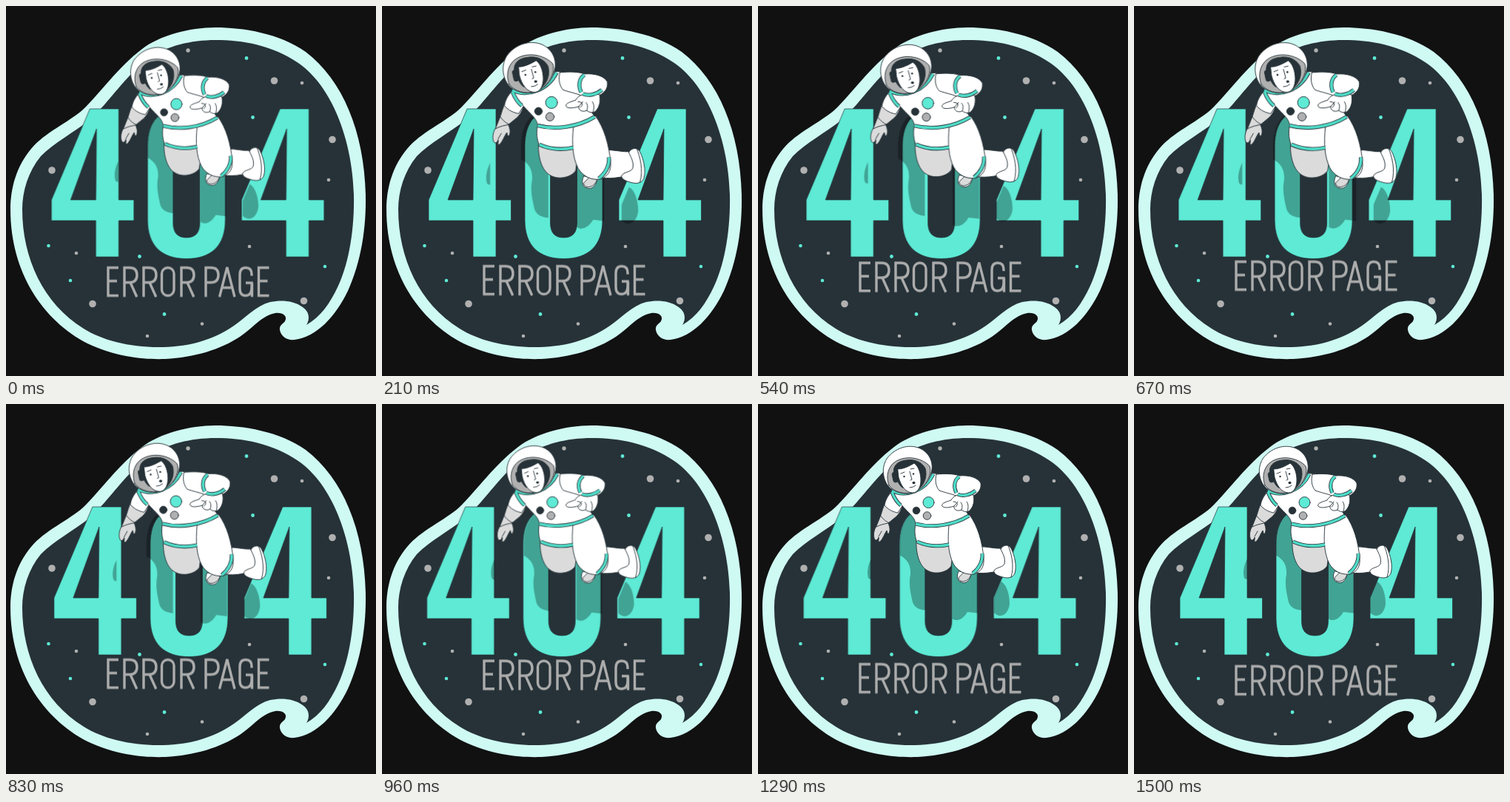
Animation of 500x500 px, one loop 1540 ms. Source, as an HTML page:

```html
<!DOCTYPE html>
<html lang="en">
<head>
<meta charset="utf-8">
<title>404 error page</title>
<style>
  html, body { margin: 0; width: 100%; height: 100%; overflow: hidden; background: #111; }
  svg { display: block; width: 100%; height: 100%; }
  #digits { animation: shake 1500ms ease infinite paused; }
  #label { animation: float 1500ms linear infinite paused; }
  #astronaut { animation: beat 1500ms ease-in-out infinite paused; transform-origin: 251px 170px; }
  @keyframes shake {
    0%, 100% { transform: translateX(0); }
    10%, 90% { transform: translateX(-1px); }
    20%, 80% { transform: translateX(2px); }
    30%, 50%, 70% { transform: translateX(-4px); }
    40%, 60% { transform: translateX(4px); }
  }
  @keyframes float {
    0%, 100% { transform: translateY(-.6px); }
    50% { transform: translateY(-10.6px); }
  }
  @keyframes beat {
    0%, 28%, 70%, 100% { transform: scale(1); }
    14%, 42% { transform: scale(1.07); }
  }
  .teal { fill: #5eead5; }
  .grey { fill: #b0b0b0; }
  .dark { fill: #263238; }
  .ink { stroke: #263238; stroke-width: .9; stroke-linejoin: round; stroke-linecap: round; }
  .white { fill: #fff; }
  .shade { fill: #dbdbdb; }
  .line { fill: none; }
  .rim { fill: none; stroke: #263238; stroke-width: 5; }
  .band { fill: none; stroke: #4fdcc8; stroke-width: 3.4; }
  #label { fill: none; stroke: #acacac; stroke-width: 3.4; }
</style>
</head>
<body>
<svg viewBox="0 0 500 500" role="img" aria-label="404 ERROR PAGE">
  <defs>
    <path id="four" d="M114 139H153V262H173.500V290H153V339H122V290H62V262ZM123 166L88 262H122Z" clip-rule="evenodd" fill-rule="evenodd"/>
    <path id="zero" d="M192 190C192 155 208 138 244.500 138S297 155 297 190V289C297 324 278 341.500 244.500 341.500S192 324 192 289ZM226.500 190V293C226.500 306 232 313 244.500 313S262.500 306 262.500 293V190C262.500 174 256 167 244.500 167S226.500 174 226.500 190Z" clip-rule="evenodd" fill-rule="evenodd"/>
    <clipPath id="numbers">
      <use href="#four"/><use href="#zero"/><use href="#four" x="257"/>
    </clipPath>
    <path id="E" d="M14 355H0V392.700H14M0 373H12"/>
    <path id="P" d="M0 394.500V355H7C14 355 17 358.500 17 364.800S14 375 7 375H0"/>
    <g id="R"><use href="#P"/><path d="M8 375L16.800 394.500"/></g>
    <g id="bands">
      <path d="M181 117C200 127 226 117 237 95"/>
      <path d="M181 119C184 127 188 133 193 137"/>
      <path d="M213 162C235 168 264 164 285 151"/>
    </g>
    <g id="legBands">
      <path d="M215 186C228 192 244 193 258 190"/>
      <path d="M290 229C298 223 304 213 303 202"/>
    </g>
    <g id="armBands">
      <path d="M270 122C277 125 287 123 294 117"/>
      <path d="M272 98C265 103 264 112 268 120"/>
    </g>
  </defs>

  <path fill="#cff9f3" d="M283 29C248 29 207 40 184 58C152 82 126 119 104 140C85 157 52 171 34 193C14 217 6 246 6 275C6 360 50 425 110 456C150 475 190 478 215 477C255 475 290 464 316 447C335 434 346 418 364 415C374 414 381 419 377 426C374 430 369 431 370 438C372 447 380 452 390 451C420 447 445 420 462 385C480 345 487 300 486 255C484 170 455 100 405 62C370 37 320 29 283 29Z"/>
  <path class="dark" d="M283 46C320 46 360 53 395 77C440 108 468 180 470 255C471 300 464 345 449 378C438 402 425 420 406 431C411 423 410 413 401 407C389 398 372 397 357 400C338 405 325 420 308 432C280 451 250 460 212 461C170 462 130 452 105 436C50 402 22 340 22 275C22 250 30 224 47 203C63 186 93 170 113 154C141 129 162 92 195 70C217 54 250 46 283 46Z"/>

  <g class="grey">
    <circle cx="62" cy="222" r="4.800"/><circle cx="362.500" cy="101" r="4.800"/>
    <circle cx="441" cy="180.500" r="4.800"/><circle cx="402.500" cy="398.500" r="4.800"/>
    <circle cx="117" cy="402.500" r="4.800"/><circle cx="246" cy="60" r="2.700"/>
    <circle cx="400" cy="104" r="2.300"/><circle cx="436" cy="235" r="2.300"/>
    <circle cx="329" cy="325" r="2.300"/><circle cx="265" cy="429.500" r="2.300"/>
    <circle cx="191" cy="446" r="2.300"/><circle cx="95" cy="334" r="2.300"/>
  </g>
  <g class="teal">
    <circle cx="325" cy="70.500" r="2.400"/><circle cx="333.500" cy="150.500" r="2.400"/>
    <circle cx="57.500" cy="324" r="2.300"/><circle cx="87" cy="371" r="2.300"/>
    <circle cx="180.500" cy="338.500" r="2.400"/><circle cx="214" cy="416.500" r="2.400"/>
    <circle cx="431" cy="352" r="2.300"/>
  </g>

  <g id="digits" class="teal" stroke="#263238" stroke-width=".7">
    <use href="#four"/><use href="#zero"/><use href="#four" x="257"/>
  </g>

  <g id="label">
    <use href="#E" x="138"/><use href="#R" x="160"/><use href="#R" x="186"/>
    <rect x="210.500" y="355" width="16.500" height="37.700" rx="8"/>
    <use href="#R" x="237"/>
    <use href="#P" x="270"/>
    <path stroke-linejoin="bevel" d="M288.500 394.500L298.800 354.500L309 394.500M292 382H305.500"/>
    <path d="M332 366V364C332 358 329.500 355 324 355S316 358.500 316 364.500V383C316 389.500 318.500 392.700 323.500 392.700C329.500 392.700 332 388.500 332 382V375.500H324M332.500 375.500V394.500"/>
    <use href="#E" x="341.500"/>
  </g>

  <g id="astronaut">
    <g clip-path="url(#numbers)" opacity=".3">
      <path d="M156 205C150 212 146 226 149 235C151 238 154 237 156 234Z"/>
      <path d="M188 150V203C199 207 207 215 206 230C203 245 207 258 209 268C212 276 219 278 228 279L262 290C271 296 279 288 283 281L300 283V150Z"/>
      <path d="M315 240H329C338 246 340 262 340 270C339 279 334 287 326 286C321 285 318 281 315 278Z"/>
    </g>

    <!-- far arm -->
    <g class="ink">
      <path class="shade" d="M179 119C173 128 169 140 166 150L160 165C156 171 156 178 157 181C158 186 162 184 163 180C164 183 161 187 165 186C169 182 171 175 174 171C175 172 174 176 177 175C179 170 178 166 176 161L187 152C192 147 194 142 195 137Z"/>
      <path class="white" d="M184 116C177 121 172 129 171 137C176 143 183 146 189 147L198 133Z"/>
      <path class="line" d="M160 166C165 163 171 162 176 161M163 179L167 172M165 150C169 156 174 160 179 161"/>
    </g>

    <!-- legs -->
    <g class="ink">
      <path class="white" d="M271 226C268 233 269 239 275 241C281 243 286 239 288 231Z"/>
      <path class="shade" d="M271 235C271 239 276 241 280 239C284 238 287 234 288 230L278 228Z"/>
      <path class="shade" d="M214 183C213 202 218 219 229 225C239 231 255 228 261 219L266 182Z"/>
      <path class="white" d="M297 193C309 192 320 196 329 195L339 196V220C326 227 307 230 294 228Z"/>
      <path class="white" d="M328 196C331 190 339 189 342 195C347 205 350 219 347 229C344 235 338 236 331 234C323 232 318 229 319 225C323 220 331 221 333 216C335 208 330 201 328 196Z"/>
      <path class="line" d="M338 191C342 201 347 218 342 234"/>
      <path class="white" d="M213 161C211 171 212 180 215 187C228 193 245 194 260 191L266 156Z"/>
      <path class="white" d="M258 164C256 185 257 202 264 216C270 226 280 231 291 230C302 227 306 219 305 208C303 186 297 165 286 150Z"/>
    </g>
    <use href="#legBands" class="rim"/><use href="#legBands" class="band"/>

    <!-- torso -->
    <path class="white ink" d="M181 117C185 127 195 138 205 148C210 153 213 158 213 163C235 169 264 164 285 151C280 142 271 135 267 127L271 108C262 98 247 93 233 94Z"/>
    <use href="#bands" class="rim"/><use href="#bands" class="band"/>
    <g class="ink">
      <circle class="teal" cx="230.500" cy="133" r="7.500"/>
      <circle class="dark" cx="214" cy="144" r="4.800"/>
      <circle class="grey" cx="228.500" cy="151" r="5.300"/>
    </g>

    <!-- near arm -->
    <g class="ink">
      <path class="white" d="M241 95C253 94 264 94 273 97C284 96 297 99 301 107C302 115 298 120 291 124L272 126C265 122 253 120 245 117C240 111 239 103 241 95Z"/>
      <path class="white" d="M291 123C293 131 291 139 286 144C282 147 277 145 275 143C269 146 264 142 265 138C259 140 251 141 249 138C247 134 255 132 261 130C263 125 271 121 278 122Z"/>
      <path class="line" d="M264 132C270 132 271 136 267 139M274 133C277 136 276 140 275 143M282 132C285 136 284 141 283 145M265 138L270 132"/>
    </g>
    <use href="#armBands" class="rim"/><use href="#armBands" class="band"/>

    <!-- helmet and face -->
    <g class="ink">
      <path class="white" d="M177 112C169 103 166 87 174 74C184 60 203 53 219 60C232 66 238 80 234 93C230 112 211 123 197 121C189 120 182 117 177 112Z"/>
      <path class="grey" d="M177 110C172 97 176 82 189 76C204 69 223 74 232 84C236 96 226 113 211 119C197 123 184 119 177 110Z"/>
      <path class="dark" d="M184 95C181 84 189 77 200 76C211 74 221 78 226 87C229 98 225 108 218 114L195 113C190 109 187 101 184 95Z"/>
      <path class="white" d="M189 88C197 88 206 83 211 80C217 84 220 94 220 103C220 112 216 120 209 120C200 120 193 111 190 99Z"/>
      <rect class="dark" x="182" y="92" width="6.500" height="14" rx="3" transform="rotate(-12 185 99)"/>
      <path class="line" d="M193 94L198 92M206 88L211 87M205 91L208 102L206 103M205 113Q210 113 213 110"/>
    </g>
    <g class="dark">
      <circle cx="197.500" cy="98" r="1.200"/><circle cx="210" cy="94.500" r="1.200"/>
      <ellipse cx="210.500" cy="106.500" rx="2" ry="1.700"/>
    </g>
  </g>
</svg>
<script>
  const LOOP = 1540, CYCLE = 1500, STEPS = 37, START = 60;
  const moves = document.getAnimations();

  // 24 steps a second; the loop opens slightly into the cycle
  function draw(now) {
    const step = Math.floor((now % LOOP + 5) / LOOP * STEPS);
    const time = Math.max(START, step * 1000 / 24) % CYCLE;
    for (const move of moves) move.currentTime = time;
    requestAnimationFrame(draw);
  }
  draw(0);
</script>
</body>
</html>
```
